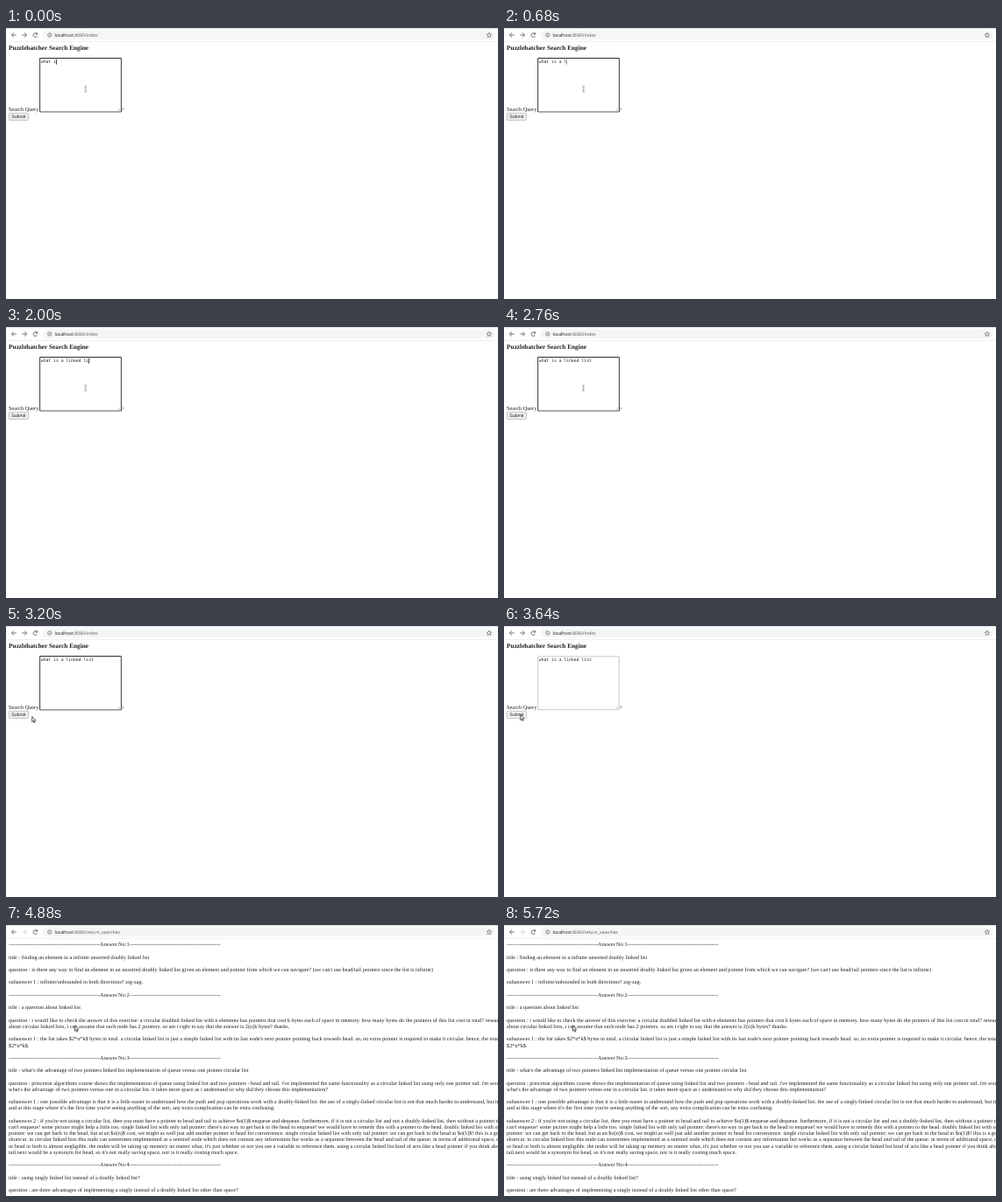
An HTML page that plays this animation: 561x310 px, repeating every 7 s.

```html
<!DOCTYPE html>
<html lang="en">
<head>
<meta charset="utf-8">
<title>Search Engine</title>
<style>
  html, body { margin: 0; width: 100%; height: 100%; overflow: hidden; background: #fff; }

  /* Laid out at browser size, then scaled down to the stage */
  .screen {
    position: absolute; width: 1439px; height: 795px; overflow: hidden;
    transform: scale(.39); transform-origin: 0 0;
    font: 16.03px/18.45px "Liberation Serif", "Times New Roman", serif;
    color: #1c1c1c; text-rendering: geometricPrecision;
  }
  .screen * { box-sizing: border-box; }
  .abs { position: absolute; white-space: pre; margin: 0; }

  .bar {
    left: 0; top: 0; width: 100%; height: 40px; background: #fff;
    border-top: 3px solid #dee1e6; border-bottom: 1px solid #d5d7da;
  }
  .omnibox { left: 108px; top: 7px; width: 1322px; height: 27px; border-radius: 14px; background: #f4f5f6; }
  .url { left: 142px; top: 11px; font: 13.1px/19px "Open Sans", "Noto Sans", sans-serif; color: #55585c; }
  .url b { font-weight: 400; color: #111; }
  .icons { left: 0; top: 0; fill: none; stroke: #4a4d51; stroke-width: 2; }

  h3 { left: 8px; top: 48.5px; font-size: 18.72px; line-height: 21.5px; }
  .label { left: 8px; top: 231px; }
  .stray { left: 337px; top: 231px; }
  .box {
    left: 99px; top: 88.5px; width: 238px; height: 157px; padding: 2px;
    background: #fff; border: 1.9px solid #767676; border-radius: 1px;
    display: flex; font: 12.2px/15px "DejaVu Sans Mono", monospace;
  }
  .typed { overflow: hidden; width: 21ch; }
  .caret { width: 1.6px; height: 15px; }
  .grip { left: 326px; top: 235px; fill: none; stroke: #777; }
  .submit {
    left: 8px; top: 248.5px; width: 57.5px; height: 22px; text-align: center;
    background: #efefef; border: 1.5px solid #767676; border-radius: 3px;
    font: 13.33px/19.5px "Liberation Sans", Arial, sans-serif;
  }
  .results { left: 8px; top: 49.4px; font: inherit; }
  .mouse { left: 0; top: 0; width: 20px; height: 24px; overflow: visible; }

  /* One shared 7 s clock */
  .url .old, .url .new, .fwd, .reload, .stop, .form, .results, .beam, .arrow,
  .typed, .caret, .box, .submit { animation: 7s step-end infinite; }
  .url .old { animation-name: before-commit; }
  .url .new { animation-name: after-commit; position: absolute; left: 0; top: 0; }
  .fwd { animation-name: fwd; }
  .reload { animation-name: reload; }
  .stop { animation-name: stop; }
  .form { animation-name: form; }
  .results { animation-name: results; }
  .beam { animation-name: beam; }
  .arrow { animation-name: arrow; }
  .typed { animation-name: typing; }
  .caret { animation-name: caret; }
  .box { animation-name: focus; }
  .submit { animation-name: press; }
  .mouse { animation: mouse 7s linear infinite; }

  @keyframes before-commit { 0% { visibility: visible } 68%, 100% { visibility: hidden } }
  @keyframes after-commit { 0% { visibility: hidden } 68%, 100% { visibility: visible } }
  @keyframes fwd { 0% { stroke: #4a4d51 } 68%, 100% { stroke: #c6c8ca } }
  @keyframes reload { 0%, 69.714%, 100% { visibility: visible } 55.428% { visibility: hidden } }
  @keyframes stop { 0%, 69.714%, 100% { visibility: hidden } 55.428% { visibility: visible } }
  @keyframes form { 0% { visibility: visible } 69.714%, 100% { visibility: hidden } }
  @keyframes results { 0% { visibility: hidden } 69.714%, 100% { visibility: visible } }
  @keyframes beam { 0% { visibility: visible } 44.2%, 100% { visibility: hidden } }
  @keyframes arrow { 0% { visibility: hidden } 44.2%, 100% { visibility: visible } }
  @keyframes typing {
    0% { width: 6ch } .571% { width: 7ch } 1.714% { width: 8ch } 4.571% { width: 9ch }
    6.857% { width: 10ch } 9.714% { width: 11ch } 12% { width: 12ch } 14.857% { width: 13ch }
    17.142% { width: 14ch } 18.857% { width: 15ch } 20.571% { width: 16ch } 22.285% { width: 17ch }
    26.285% { width: 18ch } 28% { width: 19ch } 29.714% { width: 20ch } 32%, 100% { width: 21ch }
  }
  @keyframes caret {
    0%, 46.857% { background: #000 }
    39.428%, 52%, 100% { background: transparent }
  }
  @keyframes focus {
    0% { border-color: #101010; box-shadow: 0 0 0 1px #101010 }
    52%, 100% { border-color: #767676; box-shadow: none }
  }
  @keyframes press {
    0%, 61.714%, 100% { background: #efefef }
    46.2%, 55.428% { background: #e5e5e5 }
    52% { background: #f5f5f5 }
  }
  @keyframes mouse {
    0%, 39.428% { transform: translate(232.5px, 179px) }
    42.285% { transform: translate(180px, 215px) }
    44.571% { transform: translate(110px, 252px) }
    46.285% { transform: translate(60px, 272px) }
    48% { transform: translate(46px, 271px) }
    49.714%, 61.2% { transform: translate(48px, 260px) }
    62.3% { transform: translate(105px, 272px) }
    63.2% { transform: translate(175px, 288px) }
    64%, 99.999% { transform: translate(201px, 295px) }
    100% { transform: translate(232.5px, 179px) }
  }
</style>
</head>
<body>
<div class="screen">
  <div class="form">
    <h3 class="abs">Puzzlehatcher Search Engine</h3>
    <div class="abs label">Search Query</div>
    <div class="abs stray">&gt;</div>
    <div class="abs box"><span class="typed">what is a linked list</span><span class="caret"></span></div>
    <svg class="abs grip" width="9" height="9"><path d="M0 8 8 0M4 8 8 4"/></svg>
    <div class="abs submit">Submit</div>
  </div>

<pre class="abs results">
--------------------------------------------------Answer No:1--------------------------------------------------

title : finding an element in a infinite unsorted doubly linked list

question : is there any way to find an element in an unsorted doubly linked list given an element and pointer from which we can navigate? (we can't use head/tail pointers since the list is infinite)

subanswer 1 : infinite/unbounded in both directions? zig-zag.

--------------------------------------------------Answer No:2--------------------------------------------------

title : a question about linked list

question : i would like to check the answer of this exercise: a circular doubled linked list with n elements has pointers that cost k bytes each of space in memory. how many bytes do the pointers of this list cost in total? researching
about circular linked lists, i can assume that each node has 2 pointers. so am i right to say that the answer is 2(n)k bytes? thanks.

subanswer 1 : the list takes $2*n*k$ bytes in total. a circular linked list is just a simple linked list with its last node's next pointer pointing back towards head. so, no extra pointer is required to make it circular. hence, the total is
$2*n*k$.

--------------------------------------------------Answer No:3--------------------------------------------------

title : what's the advantage of two pointers linked list implementation of queue versus one pointer circular list

question : princeton algorithms course shows the implementation of queue using linked list and two pointers - head and tail. i've implemented the same functionality as a circular linked list using only one pointer tail. i'm wondering
what's the advantage of two pointers versus one in a circular list. it takes more space as i understand so why did they choose this implementation?

subanswer 1 : one possible advantage is that it is a little easier to understand how the push and pop operations work with a doubly-linked list. the use of a singly-linked circular list is not that much harder to understand, but it is
and at this stage where it's the first time you're seeing anything of the sort, any extra complication can be extra confusing.

subanswer 2 : if you're not using a circular list, then you must have a pointer to head and tail to achieve $o(1)$ enqueue and dequeue. furthermore, if it is not a circular list and not a doubly-linked list, then without a pointer to tail
can't enqueue! some picture might help a little too. single linked list with only tail pointer: there's no way to get back to the head to enqueue! we would have to remedy this with a pointer to the head. doubly linked list with one
pointer: we can get back to the head, but at an $o(n)$ cost, we might as well just add another pointer to head for convenience. single circular linked list with only tail pointer: we can get back to the head in $o(1)$! this is a good
shortcut. in circular linked lists this node can sometimes implemented as a sentinel node which does not contain any information but works as a separator between the head and tail of the queue. in terms of additional space, one
or head or both is almost negligible. the nodes will be taking up memory no matter what, it's just whether or not you use a variable to reference them. using a circular linked list kind of acts like a head pointer if you think about it
tail.next would be a synonym for head, so it's not really saving space, nor is it really costing much space.

--------------------------------------------------Answer No:4--------------------------------------------------

title : using singly linked list instead of a doubly linked list?

question : are there advantages of implementing a singly instead of a doubly linked list other than space?
</pre>

  <div class="abs bar"></div>
  <div class="abs omnibox"></div>
  <svg class="abs icons" width="1439" height="40">
    <path d="M30 20.5H17M23 14l-6.5 6.5L23 27"/>
    <path class="fwd" d="M47 20.5H60M54 14l6.5 6.5L54 27"/>
    <g class="reload">
      <path d="M91 24a6 6 0 1 1-.8-7.6"/>
      <path d="M92 13v6.5h-6.5z" fill="#4a4d51" stroke="none"/>
    </g>
    <path class="stop" d="M80 15l11 11M91 15L80 26"/>
    <g stroke-width="1.5">
      <circle cx="127.5" cy="20.5" r="5.5"/>
      <path d="M127.5 19.5v4M127.5 17v1.4"/>
      <path d="M1412.5 13.5l2 4.7 5.2.5-3.9 3.4 1.2 5-4.5-2.7-4.5 2.7 1.2-5-3.9-3.4 5.2-.5z"/>
    </g>
  </svg>
  <div class="abs url"><span class="old"><b>localhost</b>:8080/index</span><span class="new"><b>localhost</b>:8080/return_searches</span></div>

  <svg class="abs mouse">
    <path class="beam" d="M-3-8H-1L0-7 1-8H3M0-7V7M-3 8H-1L0 7 1 8H3" fill="none" stroke="#222" stroke-width="1.3"/>
    <path class="arrow" d="M0 0V16L3.6 12.6 6 18.2 8.4 17.2 6 11.6H11Z" fill="#fff" stroke="#000" stroke-width="1.7"/>
  </svg>
</div>
</body>
</html>
```
